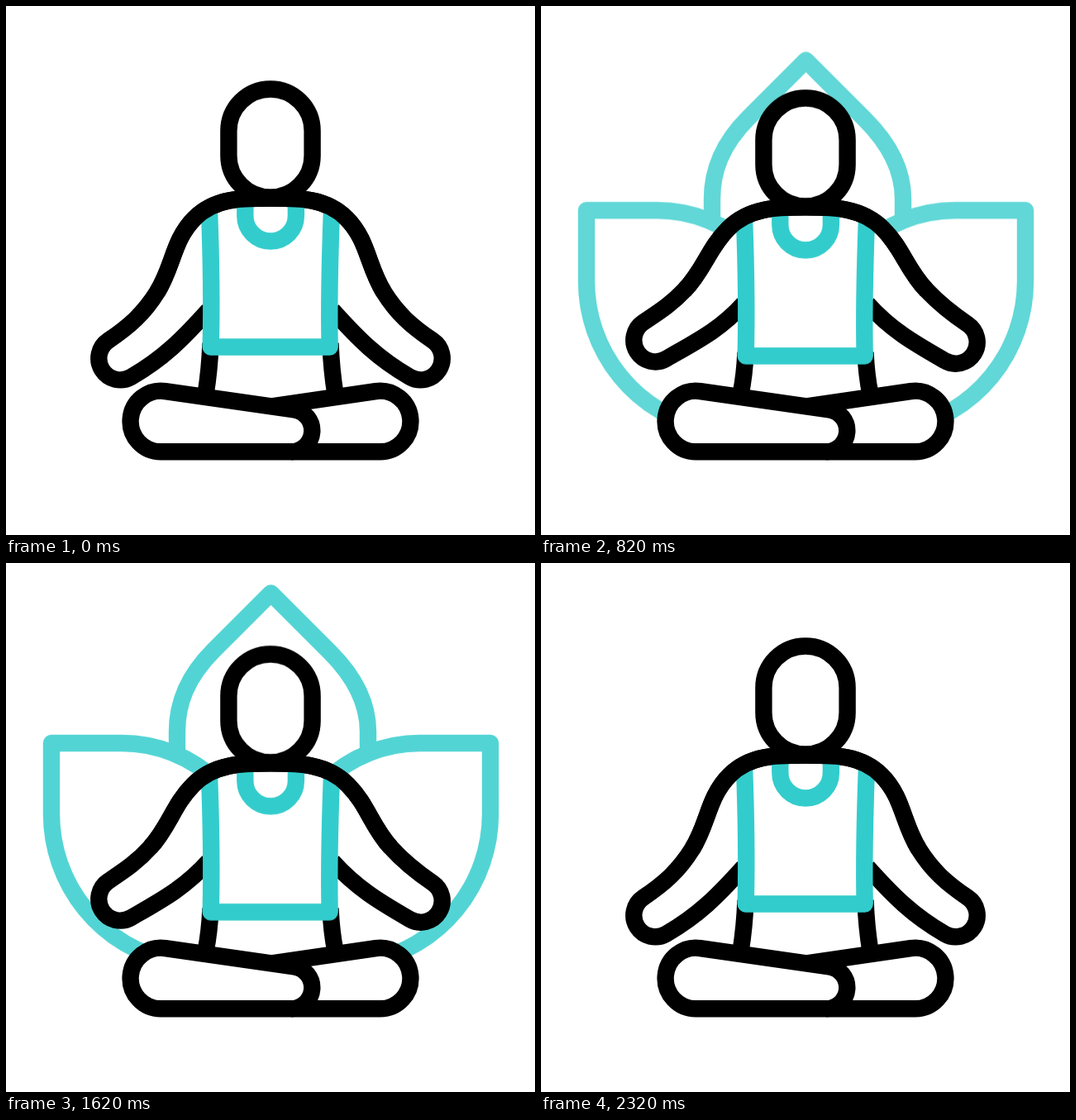
Write an HTML page that moves like this. It is 640x640 px and loops after 2400 ms.

```html
<!DOCTYPE html>
<html lang="en">
<head>
<meta charset="utf-8">
<title>Meditation</title>
<style>
  html, body { margin: 0; width: 100%; height: 100%; overflow: hidden; background: #fff; }
  svg { display: block; width: 100%; height: 100%; }
  path, rect { fill: none; stroke: #000; stroke-width: 20.4; stroke-linejoin: round; }
  .teal path { stroke: #3cc; }
  .white { fill: #fff; }
  #skin { fill: #fff; stroke: none; }
</style>
</head>
<body>
<svg viewBox="0 0 640 640">
  <g id="lotus" class="teal">
    <path d="M207 238V215C207 182 218 150 251 117L320.5 47.5L392 119C425 152 438 184 438 215V238"/>
    <path id="petal" d="M255 275A167 167 0 0 0 140 229H55V315A182 182 0 0 0 200 493"/>
    <use href="#petal" transform="translate(641) scale(-1 1)"/>
  </g>
  <path id="skin"/>
  <path id="waist"/>
  <path id="arms"/>
  <g id="shirt" class="teal">
    <path d="M289.3 238V253.7A30.8 30.8 0 0 0 350.9 253.7V238"/>
    <path d="M246 247C248 300 249 360 247.7 412.5H391.7C390.5 360 392 300 394 247"/>
  </g>
  <path id="yoke"/>
  <rect id="head" class="white" x="269.4" y="100.5" width="101.2" height="131" rx="50.6"/>
  <path class="white" d="M345 539.3H452.5A36.8 36.8 0 1 0 447.2 466.1L320 484.6"/>
  <path class="white" d="M345 539.3H187.5A36.8 36.8 0 1 1 192.8 466.1L348.6 488.4A25.6 25.6 0 0 1 345 539.3Z"/>
</svg>
<script>
const LOOP = 2400;
const SINE = 'cubic-bezier(.37,0,.63,1)';
const RISE = 14;
const PALM = 26;
const $ = id => document.getElementById(id);

// A joint has a distance from the body's axis, a height and a heading in degrees.
const joint = (x, y, deg) => {
  const a = deg * Math.PI / 180;
  return { x, y, cos: Math.cos(a), sin: Math.sin(a) };
};

// Point on the palm's edge where a line with the given heading touches it.
const touch = (x, y, deg) => {
  const { cos, sin } = joint(0, 0, deg);
  return joint(x + PALM * sin, y - PALM * cos, deg);
};

// Paths for one side of the body (-1 left, 1 right); k goes from 0 (rest) to 1 (raised).
function half(side, k) {
  const at = (x, y) => `${(320 + side * x).toFixed(2)} ${y.toFixed(2)} `;
  const bend = (p, q) => {
    const d = 0.37 * Math.hypot(q.x - p.x, q.y - p.y);
    return 'C' + at(p.x + d * p.cos, p.y + d * p.sin) +
      at(q.x - d * q.cos, q.y - d * q.sin) + at(q.x, q.y);
  };
  const lift = side < 0 ? 28.3 : 25.3;
  const palmY = 426.3 - lift * k;
  const neck = joint(0, 232.5 + RISE * k, 0);
  const shoulder = joint(92 + 2 * k, 257 + 16 * k, 45);
  const elbow = joint(137 + 12 * k, 346 - 3 * k, 58 - 16 * k);
  const wrist = touch(181.7, palmY, 34);
  const heel = touch(181.7, palmY, 210);
  const flank = joint(75, 368 - 10 * k, 228);

  const yoke = 'M' + at(neck.x, neck.y) + bend(neck, shoulder) + bend(shoulder, elbow);
  const arms = yoke + bend(elbow, wrist) +
    `A${PALM} ${PALM} 0 0 ${side < 0 ? 0 : 1} ` + at(heel.x, heel.y) + bend(heel, flank);
  const top = RISE * k;
  return {
    yoke,
    arms,
    skin: arms + 'L' + at(78, 475) + 'L' + at(0, 485) + 'Z',
    waist: 'M' + at(72.5, 408 + top) + 'Q' + at(73.7, 440 + 0.6 * top) + at(78.5, 470)
  };
}

const breathe = (id, low, high) => $(id).animate([
  { ...low, easing: SINE },
  { ...high, offset: 0.5, easing: SINE },
  { ...low, offset: 0.972 },
  low
], { duration: LOOP, iterations: Infinity });

for (const id of ['skin', 'waist', 'arms', 'yoke']) {
  const pose = k => ({ d: `path("${half(-1, k)[id]}${half(1, k)[id]}")` });
  breathe(id, pose(0), pose(1));
}
const shift = y => ({ transform: `translateY(${y}px)` });
for (const id of ['head', 'shirt']) breathe(id, shift(0), shift(RISE));

const loop = { duration: LOOP, iterations: Infinity };
$('lotus').animate([shift(48.3), shift(-39.6)], loop);
$('lotus').animate([
  { opacity: 0, easing: SINE },
  { opacity: 1, offset: 0.5 },
  { opacity: 1, offset: 0.605, easing: SINE },
  { opacity: 0, offset: 0.872 },
  { opacity: 0 }
], loop);
</script>
</body>
</html>
```
